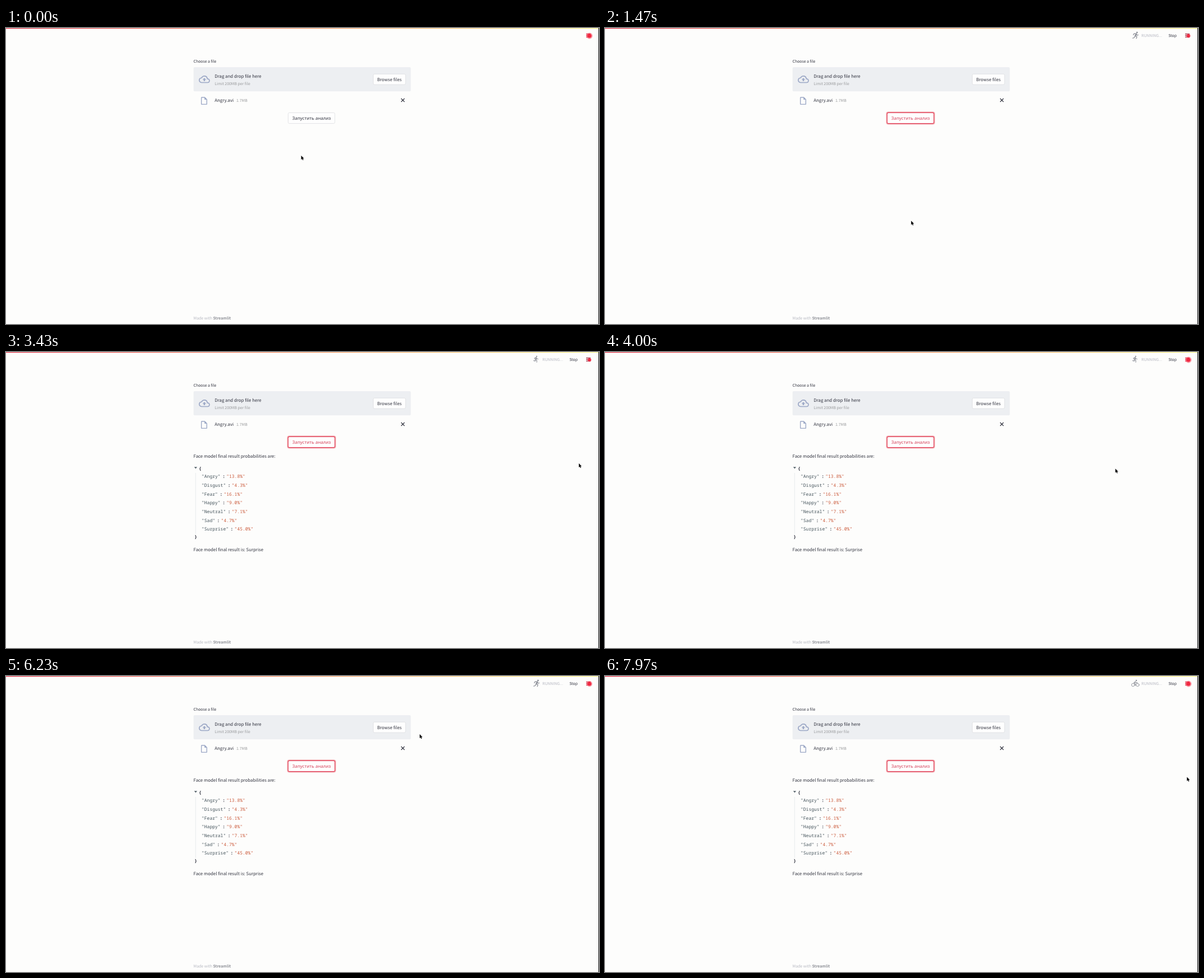
Animation of 1058x529 px, one loop 8000 ms. Source, as an HTML page:

```html
<!DOCTYPE html>
<html lang="en">
<head>
<meta charset="utf-8">
<title>Video analysis</title>
<style>
html, body { margin: 0; width: 100%; height: 100%; overflow: hidden; background: #fdfdfc; }
svg { display: block; width: 1058px; height: 529px; text-rendering: geometricPrecision;
  font-family: "Noto Sans CJK SC", "Noto Sans CJK JP", "Noto Sans CJK", "Noto Sans", sans-serif; }
text { white-space: pre; fill: #31333f; }
.md { font-size: 7.85px; }
.sm { font-size: 6.9px; }
.ru { font: 7.9px "Noto Sans", "Open Sans", sans-serif; text-anchor: middle; }
.code { font: 8px "Noto Sans Mono", "DejaVu Sans Mono", monospace; }
.code .key { fill: #43525a; }
.code .val { fill: #cb5b3c; }
.bold { font-weight: bold; }
.muted { fill: #999a9c; }
.pale { fill: #b6b8c0; }
.icon { fill: #9ca8c6; }
.line { fill: none; stroke: #8f929a; stroke-width: 1.3; stroke-linecap: round; stroke-linejoin: round; }
.wheel { stroke-width: .9; }
.pose circle.head, .pose path.solid { fill: #8f929a; }
</style>
</head>
<body>
<svg viewBox="0 0 1058 529" xmlns="http://www.w3.org/2000/svg">
  <defs>
    <linearGradient id="bar">
      <stop offset="0" stop-color="#e2364a"/>
      <stop offset=".5" stop-color="#f99a68"/>
      <stop offset="1" stop-color="#fdf98c"/>
    </linearGradient>
    <radialGradient id="glow">
      <stop offset=".4" stop-color="#f5263f"/>
      <stop offset="1" stop-color="#f5263f" stop-opacity="0"/>
    </radialGradient>
    <g id="copy" fill="none" stroke="#4d98d0" stroke-width=".9">
      <path d="M3 6.4H.6V1.2H5.6V2.6M2 1.2V.5H4.2V1.2M1.8 3H3"/>
      <path d="M3 3H6.4V6.6H3ZM4.2 4.8H7"/>
    </g>
  </defs>
  <rect width="1058" height="529" fill="#fdfdfc"/>
  <rect width="1058" height="1.2" fill="url(#bar)"/>

  <text class="sm" x="334.6" y="62.3">Choose a file</text>
  <rect x="334.6" y="70" width="387.6" height="43.3" rx="2" fill="#edeff2"/>
  <path class="icon" transform="translate(344 81.8) scale(.826)" d="M19.35 10.04A7.49 7.49 0 0 0 12 4C9.11 4 6.6 5.64 5.35 8.04A5.994 5.994 0 0 0 0 14c0 3.31 2.69 6 6 6h13c2.76 0 5-2.24 5-5 0-2.64-2.05-4.78-4.65-4.96zM19 18H6c-2.21 0-4-1.79-4-4 0-2.05 1.53-3.76 3.56-3.97l1.07-.11.5-.95A5.469 5.469 0 0 1 12 6c2.62 0 4.88 1.86 5.39 4.43l.3 1.5 1.53.11A2.98 2.98 0 0 1 22 15c0 1.65-1.35 3-3 3zM8 13h2.55v3h2.9v-3H16l-4-4z"/>
  <text class="md" x="372.3" y="88.7">Drag and drop file here</text>
  <text class="sm muted" x="372.3" y="102.4">Limit 200MB per file</text>
  <rect x="655.3" y="82.3" width="57.6" height="18.8" rx="2.2" fill="#fefefe" stroke="#d9dadd" stroke-width=".7"/>
  <text class="md" x="684.1" y="94.6" text-anchor="middle">Browse files</text>

  <path class="icon" transform="translate(345.2 121.9) scale(.688)" d="M14 2H6c-1.1 0-1.99.9-1.99 2L4 20c0 1.1.89 2 1.99 2H18c1.1 0 2-.9 2-2V8l-6-6zM6 20V4h7v5h5v11H6z"/>
  <text class="md" x="372.3" y="132.2">Angry.avi</text>
  <text class="sm muted" x="411" y="132">1.7MB</text>
  <path d="M705 126L711 132M711 126L705 132" stroke="#31333f" stroke-width="1.2"/>

  <rect id="ring" x="502.4" y="150.5" width="85.4" height="21" rx="2.8" fill="none" stroke="#f4a8ad" stroke-width="1.8"/>
  <rect id="button" x="503.4" y="151.4" width="83.3" height="19.2" rx="2.2" fill="#fefefe"/>
  <text id="label" class="ru" x="545.1" y="163.9">Запустить анализ</text>

  <g id="status">
    <g class="pose" id="sprint">
      <circle class="head" cx="949.2" cy="8" r="1.5"/>
      <path class="line" d="M947.8 10.5L945.9 14.2" style="stroke-width:2.3"/>
      <path class="line" d="M947.6 10.3L944.2 9.9L942.6 12.2M948 10.8L949.2 12.8L951.4 12.4M946 14.2L949 15.4L948 18.8M945.7 14.4L944.6 17L941.6 18.2"/>
    </g>
    <g class="pose" id="stride">
      <path class="solid" transform="translate(939.3 6) scale(.55)" d="M13.49 5.48c1.1 0 2-.9 2-2s-.9-2-2-2-2 .9-2 2 .9 2 2 2zm-3.6 13.9l1-4.4 2.1 2v6h2v-7.5l-2.1-2 .6-3c1.3 1.5 3.3 2.5 5.5 2.5v-2c-1.9 0-3.5-1-4.3-2.4l-1-1.6c-.4-.6-1-1-1.7-1-.3 0-.5.1-.8.1l-5.2 2.2v4.7h2v-3.4l1.8-.7-1.6 8.1-4.9-1-.4 2 7 1.4z"/>
    </g>
    <g class="pose" id="bike">
      <circle class="head" cx="947.9" cy="8" r="1.3"/>
      <circle class="line wheel" cx="942.1" cy="15.9" r="2.7"/>
      <circle class="line wheel" cx="950.3" cy="15.9" r="2.7"/>
      <path class="line" d="M950 12.1H947.8L946 10.2L943.7 12.3L946.2 14V17"/>
    </g>
    <text class="sm pale" x="957" y="15.5">RUNNING...</text>
    <text class="sm" x="1005.2" y="15.5">Stop</text>
  </g>
  <path id="menu" d="M1035 10.7h8M1035 13.4h8M1035 16.1h8" stroke-width="1.2"/>
  <circle id="halo" cx="1041" cy="14" fill="url(#glow)"/>
  <circle cx="1041" cy="14" r="2.6" fill="#ee2840"/>

  <g id="result">
    <text class="md" x="334.6" y="189.2">Face model final result probabilities are:</text>
    <path d="M335.7 205.5h5.4l-2.7 3z" fill="#4d5a62"/>
    <path d="M338.3 216V325" stroke="#e4e6ea" stroke-width=".8"/>
    <text class="code bold" x="344" y="211.4">{</text>
    <g id="rows"></g>
    <text class="code bold" x="336.3" y="333.2">}</text>
    <text class="md" x="334.6" y="355.6">Face model final result is: Surprise</text>
    <use id="rootCopy" href="#copy" x="354.3" y="203.3"/>
    <use id="rowCopy" href="#copy"/>
  </g>

  <text class="sm pale" x="334.6" y="521.4">Made with <tspan class="bold" fill="#8d8f96">Streamlit</tspan></text>
  <rect x="1057" width="1" height="529" fill="#111"/>
  <path id="cursor" d="M0 0V7.3L1.7 5.8L2.8 8.3L4.1 7.7L3 5.3H5.2Z" fill="#080808" stroke="#fff" stroke-width=".5" paint-order="stroke"/>
</svg>
<script>
const LOOP = 8000, HOVER = 560, CLICK = 760, RUN = 860, DONE = 2300;
const ROW_TOP = 215.3, ROW_STEP = 15.63, CHAR = 4.8;
const scores = { Angry: '13.8%', Disgust: '4.3%', Fear: '16.1%', Happy: '9.0%',
  Neutral: '7.1%', Sad: '4.7%', Surprise: '45.0%' };
// time, x, y of the pointer tip
const path = [[0, 526.6, 228], [150, 526.6, 228], [620, 546, 162], [900, 546, 162],
  [1400, 546.2, 344.5], [2300, 546.2, 344.5], [3250, 1022, 199], [3600, 1022, 199],
  [4700, 652.6, 230.5], [5200, 652.6, 230.5], [6100, 738, 104], [6300, 738, 104],
  [6800, 1066, 96], [7400, 1066, 150], [7900, 1038.2, 180.5], [8000, 1038.2, 180.5]];
const poses = [[0, 'sprint'], [2300, 'stride'], [4200, 'sprint'], [6600, 'stride'], [7500, 'bike']];

const el = id => document.getElementById(id);
const show = (id, on) => el(id).style.display = on ? '' : 'none';
const mix = (a, b, k) => a + (b - a) * k;

const ends = Object.entries(scores).map(([name, score], i) => {
  const y = 225.4 + i * ROW_STEP, gap = 349 + (name.length + 2) * CHAR;
  const put = (x, cls, str) => {
    const node = document.createElementNS('http://www.w3.org/2000/svg', 'text');
    node.setAttribute('class', 'code ' + cls);
    node.setAttribute('x', x);
    node.setAttribute('y', y);
    const span = document.createElementNS(node.namespaceURI, 'tspan');
    span.setAttribute('class', cls);
    span.textContent = str;
    node.append(span);
    el('rows').append(node);
  };
  put(349, 'key', `"${name}"`);
  put(gap + 3.6, 'bold', ':');
  put(gap + 10.6, 'val', `"${score}"`);
  return gap + 10.6 + (score.length + 2) * CHAR;
});

function pointer(t) {
  const i = Math.max(1, path.findIndex(p => p[0] > t));
  const [t0, x0, y0] = path[i - 1], [t1, x1, y1] = path[i];
  const k = (t - t0) / (t1 - t0), e = k * k * (3 - 2 * k);
  return [mix(x0, x1, e), mix(y0, y1, e)];
}

function draw(t) {
  const [x, y] = pointer(t);
  el('cursor').setAttribute('transform', `translate(${x} ${y})`);

  const hot = t >= HOVER;
  el('button').setAttribute('stroke', hot ? '#df4059' : '#d9dadd');
  el('button').setAttribute('stroke-width', hot ? 1.1 : .7);
  el('label').style.fill = hot ? '#d63f59' : '';
  show('ring', t >= CLICK);
  show('status', t >= RUN);
  show('result', t >= DONE);

  const pose = poses.filter(p => p[0] <= t).pop()[1];
  ['sprint', 'stride', 'bike'].forEach(id => show(id, id === pose));

  const beat = .5 + .5 * Math.cos(t * Math.PI / 1000);
  el('halo').setAttribute('r', 2.6 + 3.6 * beat);
  el('menu').setAttribute('stroke', `rgb(${mix(96, 214, beat)},${mix(34, 36, beat)},${mix(50, 62, beat)})`);

  const inside = x > 334 && x < 722 && y > 200 && y < 338;
  const row = Math.floor((y - ROW_TOP) / ROW_STEP);
  const onRow = inside && row >= 0 && row < ends.length;
  show('rootCopy', inside);
  show('rowCopy', onRow);
  if (onRow) {
    el('rowCopy').setAttribute('x', ends[row] + 3.6);
    el('rowCopy').setAttribute('y', 217.2 + row * ROW_STEP);
  }
}

const start = performance.now();
function tick() {
  draw((performance.now() - start) % LOOP);
  requestAnimationFrame(tick);
}
tick();
</script>
</body>
</html>
```
